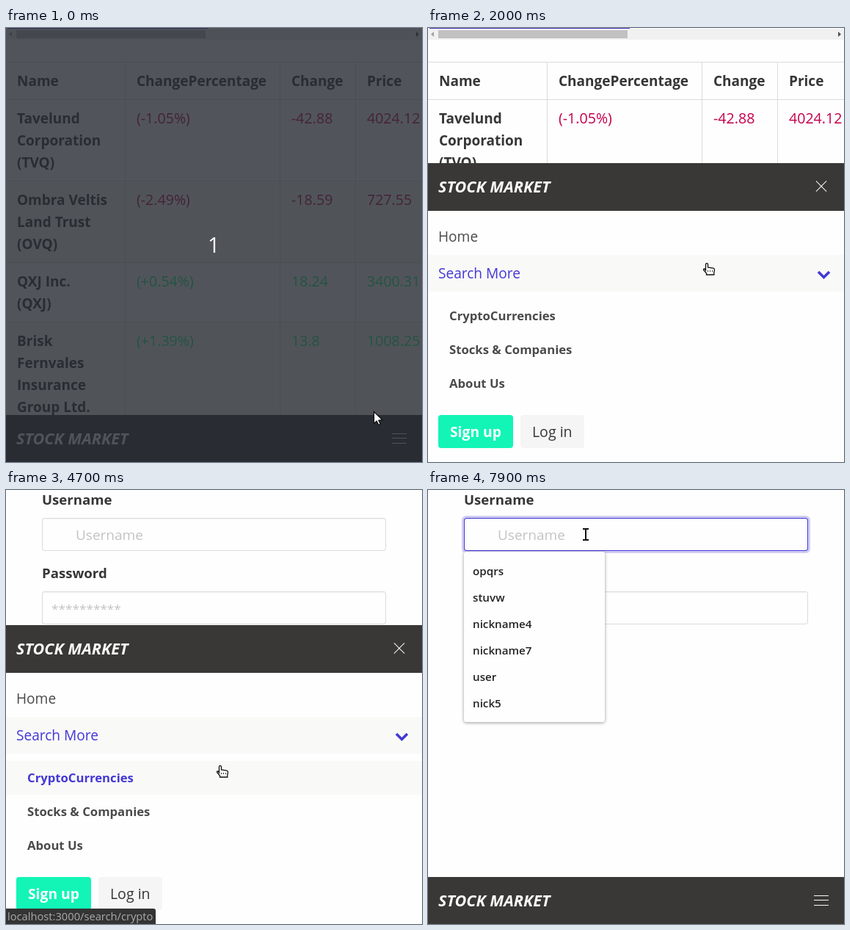
Recreate the animation shown at these times as an HTML page with a canvas. Size 567 by 591 pixels, loop 8000 ms.

```html
<!DOCTYPE html>
<html lang="en">
<head>
<meta charset="utf-8">
<title>Stock market menu</title>
<style>
html, body { margin: 0; width: 100%; height: 100%; overflow: hidden; background: #fefefe; }
canvas { display: block; width: 567px; height: 591px; }
</style>
</head>
<body>
<canvas id="stage" width="567" height="591"></canvas>
<script>
const W = 567, H = 591, LOOP = 8000, STEP = 100;
const ctx = document.getElementById('stage').getContext('2d');
const PAGE = '#fefefe', DARK = '#393836', LINE = '#dbdbdb', STRIPE = '#f9f9f8';
const INK = '#363636', BODY = '#4a4a4a', BLUE = '#4338d6';
const RED = '#c4004c', GREEN = '#22f47f';

// Pointer path: time, x, y
const PATH = [
  [0, 501, 522], [100, 511, 537], [300, 525, 552], [600, 533, 560], [1500, 533, 560],
  [1800, 470, 440], [2000, 380, 320], [2200, 322, 264], [2300, 322, 264], [2500, 316, 263],
  [2600, 316, 263], [2800, 298, 326], [3000, 282, 372], [3200, 275, 391], [3300, 275, 391],
  [3400, 276, 392], [4600, 276, 392], [4700, 292, 375], [4900, 425, 285], [5100, 536, 219],
  [5200, 536, 219], [5400, 539, 215], [6000, 539, 215], [6100, 490, 252], [6200, 360, 296],
  [6300, 220, 304], [6400, 154, 236], [6500, 152, 192], [6600, 163, 165], [6700, 163, 165],
  [7000, 203, 85], [7200, 215, 60]
];
const STOCKS = [
  { top: 98, name: ['Tavelund', 'Corporation', '(TVQ)'], cells: ['(-1.05%)', '-42.88', '4024.12'], color: RED },
  { top: 209, name: ['Ombra Veltis', 'Land Trust', '(OVQ)'], cells: ['(-2.49%)', '-18.59', '727.55'], color: RED },
  { top: 320, name: ['QXJ Inc.', '(QXJ)'], cells: ['(+0.54%)', '18.24', '3400.31'], color: GREEN },
  { top: 401, name: ['Brisk', 'Fernvales', 'Insurance', 'Group Ltd.'], cells: ['(+1.39%)', '13.8', '1008.25'], color: GREEN }
];
const COLS = [178, 389, 492];
const SUBMENU = ['CryptoCurrencies', 'Stocks & Companies', 'About Us'];
const SAVED = ['opqrs', 'stuvw', 'nickname4', 'nickname7', 'user', 'nick5'];

const clamp = v => Math.max(0, Math.min(1, v));
const within = (v, a, b) => v >= a && v < b;

function rect(x, y, w, h, color) {
  ctx.fillStyle = color;
  ctx.fillRect(x, y, w, h);
}

function box(x, y, w, h, r, color) {
  ctx.beginPath();
  ctx.roundRect(x, y, w, h, r);
  ctx.fillStyle = color;
  ctx.fill();
}

function text(s, x, y, size, color, style = '400') {
  ctx.font = `${style} ${size}px "Open Sans", "Noto Sans", sans-serif`;
  ctx.fillStyle = color;
  ctx.fillText(s, x, y);
}

function stroke(points, color, width) {
  ctx.beginPath();
  points.forEach(p => ctx.lineTo(p[0], p[1]));
  ctx.strokeStyle = color;
  ctx.lineWidth = width;
  ctx.stroke();
}

function pointerAt(t) {
  const i = PATH.findIndex(p => p[0] > t);
  if (i < 0) return PATH[PATH.length - 1].slice(1);
  const [t0, x0, y0] = PATH[i - 1], [t1, x1, y1] = PATH[i];
  const k = (t - t0) / (t1 - t0);
  return [Math.round(x0 + (x1 - x0) * k), Math.round(y0 + (y1 - y0) * k)];
}

function drawTable() {
  rect(0, 1, W, 15, '#f1f1f1');
  rect(2, 0, 273, 1, '#4a40c0');
  rect(14, 3, 258, 11, '#c1c1c1');
  for (const [x, dir, color] of [[5, 1, '#a3a3a3'], [562, -1, '#505050']]) {
    ctx.beginPath();
    ctx.moveTo(x - dir, 8.5);
    ctx.lineTo(x + 3 * dir, 5);
    ctx.lineTo(x + 3 * dir, 12);
    ctx.fillStyle = color;
    ctx.fill();
  }
  rect(0, 209, W, 110, STRIPE);
  rect(0, 401, W, 190, STRIPE);
  for (const y of [46, 97, 208, 319, 400]) rect(0, y, W, 1, LINE);
  for (const x of [162, 373, 476]) rect(x, 46, 1, 545, LINE);
  text('Name', 15, 79, 19, INK, '700');
  ['ChangePercentage', 'Change', 'Price'].forEach((s, i) => text(s, COLS[i], 79, 19, INK, '700'));
  for (const row of STOCKS) {
    row.name.forEach((s, i) => text(s, 15, row.top + 32 + 30 * i, 19, INK, '700'));
    row.cells.forEach((s, i) => text(s, COLS[i], row.top + 32, 19.6, row.color, '500'));
  }
}

function drawInput(y, border) {
  box(49, y, 469, 45, 4, border);
  box(50, y + 1, 467, 43, 3, PAGE);
  rect(52, y + 1, 463, 1, '#f3f3f3');
}

function drawLogin(t, x, y) {
  const focus = t >= 7200;
  const over = top => within(y, top, top + 45) && within(x, 49, 518);
  const border = top => over(top) ? '#b5b5b5' : LINE;
  text('Username', 49, 20, 18.6, INK, '700');
  if (focus) box(46, 35, 475, 51, 6, '#d0cdf4');
  drawInput(38, focus ? BLUE : border(38));
  text('Username', 95, 68, 19, '#c3c3c3');
  text('Password', 49, 120, 18.6, INK, '700');
  drawInput(138, border(138));
  text('**********', 62, 168, 17.2, '#c3c3c3');
  box(49, 198, 83, 45, 4, BLUE);
  text('Login', 65, 228, 19.6, '#fff');
  text('Cancel', 163, 228, 19.4, BODY);
  rect(163, 230, 60, 1, BODY);
  text('Login to gain access', 50, 278, 19.6, RED, 'italic 500');
  if (t >= 7300) drawSaved();
  if (focus && t < 7900) rect(95, 49, 1, 23, INK);
}

function drawSaved() {
  ctx.save();
  ctx.shadowColor = 'rgba(0,0,0,.4)';
  ctx.shadowBlur = 4;
  ctx.shadowOffsetY = 1;
  box(49, 84, 192, 232, 3, PAGE);
  ctx.restore();
  SAVED.forEach((s, i) => text(s, 61, 116 + 36 * i, 15.2, '#222', '600'));
}

function drawBar(y, k) {
  rect(0, y, W, 65, DARK);
  text('STOCK MARKET', 14, y + 40, 21.6, '#fafafa', 'italic 700');
  ctx.save();
  ctx.translate(536, y + 31.5);
  for (const offset of [-6, 0, 7]) {
    ctx.save();
    ctx.translate(0, offset * (1 - k));
    ctx.rotate(-Math.sign(offset) * k * Math.PI / 4);
    if (!offset) ctx.globalAlpha = 1 - k;
    rect(-10, -0.5, 20, 1, '#fafafa');
    ctx.restore();
  }
  ctx.restore();
}

function drawMenu(y) {
  rect(0, 249, W, 342, PAGE);
  const home = within(y, 259, 309), more = within(y, 309, 507);
  if (home) rect(0, 259, W, 50, STRIPE);
  if (more) rect(0, 309, W, 50, STRIPE);
  text('Home', 14, 291, 19.1, home ? BLUE : BODY);
  text('Search More', 14, 341, 19.1, more ? BLUE : BODY);
  stroke([[532, 332], [539.5, 339.5], [547, 332]], BLUE, 3.6);
  SUBMENU.forEach((s, i) => {
    const top = 369 + 46 * i, hot = within(y, top, top + 46);
    if (hot) rect(0, top, W, 46, STRIPE);
    text(s, 29, top + 29, 16.7, hot ? BLUE : BODY, '700');
  });
  box(14, 527, 102, 45, 4, '#12f5b7');
  text('Sign up', 30, 557, 19.3, '#fff', '700');
  box(126, 527, 87, 45, 4, '#f5f5f5');
  text('Log in', 142, 557, 19.5, INK);
}

function drawStatus(t) {
  const alpha = Math.min(clamp((t - 2300) / 200), clamp((5400 - t) / 200));
  if (!alpha) return;
  const crypto = t >= 3100 && t < 5000;
  ctx.globalAlpha = alpha;
  box(0, 570, crypto ? 204 : 104, 21, [0, 3, 0, 0], '#343434');
  text('localhost:3000' + (crypto ? '/search/crypto' : ''), 2, 586, 14.7, '#ababab');
  ctx.globalAlpha = 1;
}

function pointerKind(t, open, x, y) {
  if (open) {
    const link = within(y, 259, 359) || within(y, 369, 507);
    const button = within(y, 527, 572) && x < 213;
    return link || button || (within(y, 184, 249) && x > 502) ? 'hand' : 'arrow';
  }
  if (y >= 527) return x > 502 ? 'hand' : 'arrow';
  if (t < 4100) return 'arrow';
  if (within(x, 49, 518) && (within(y, 38, 83) || within(y, 138, 183))) return 'beam';
  return within(y, 198, 243) && within(x, 49, 239) ? 'hand' : 'arrow';
}

const ARROW = new Path2D('M.5 .5V16.5L4.2 13.2L6.8 18.6L9.3 17.5L6.9 12.2L12 11.7Z');
const HAND = new Path2D('M-1.5 10V2Q-1.5 .5 0 .5T1.5 2V6L9 7.2Q10.5 7.7 10.5 9.5L9.8 13V16H-.5V14L-4.3 9.7Q-5 8 -3.2 7.8Z');

function drawPointer(kind, x, y) {
  ctx.save();
  ctx.translate(x, y);
  if (kind === 'beam') {
    for (const [color, pad] of [['#fff', 1], ['#111', 0]]) {
      rect(-1 - pad, -8 - pad, 2 + 2 * pad, 17 + 2 * pad, color);
      for (const end of [-8, 7]) rect(-4 - pad, end - pad, 8 + 2 * pad, 2 + 2 * pad, color);
    }
  } else {
    const shape = kind === 'hand' ? HAND : ARROW;
    ctx.fillStyle = '#fff';
    ctx.fill(shape);
    ctx.strokeStyle = '#111';
    ctx.lineWidth = 1.3;
    ctx.stroke(shape);
    if (kind === 'hand') for (const dx of [1, 4, 7]) rect(dx, 10, 1, 2, '#333');
  }
  ctx.restore();
}

function draw(t) {
  const open = t >= 1200 && t < 5600;
  const [x, y] = pointerAt(t);
  const cross = Math.min(clamp(0.25 + (t - 1200) / 133), clamp(0.7 - (t - 5600) / 140));
  rect(0, 0, W, H, PAGE);
  if (t < 4100) drawTable();
  else drawLogin(t, x, y);
  if (open) drawMenu(y);
  drawBar(open ? 184 : 527, t < 1200 ? 0 : cross);
  if (open) drawStatus(t);
  if (t < 100) {
    rect(0, 0, W, H, 'rgba(38,43,50,.8)');
    text('1', 275, 306, 29, '#fff');
  }
  drawPointer(pointerKind(t, open, x, y), x, y);
}

function tick() {
  const t = performance.now() % LOOP;
  draw(Math.floor(t / STEP) * STEP);
  requestAnimationFrame(tick);
}
tick();
</script>
</body>
</html>
```
